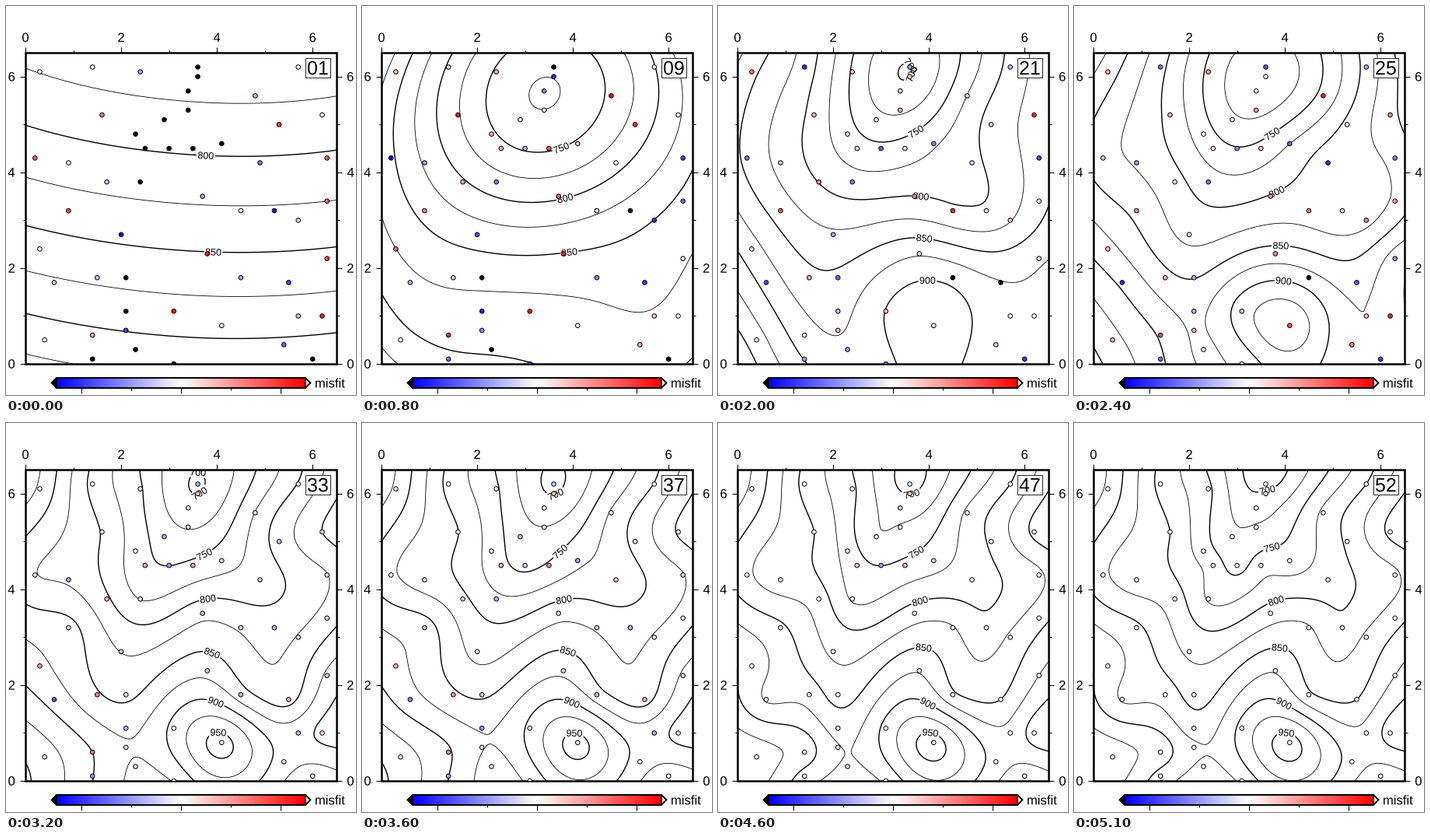
Animation of 450x500 px, one loop 5200 ms. Source, as a matplotlib script:

```python
import numpy as np
import matplotlib.pyplot as plt
from matplotlib.animation import FuncAnimation
from matplotlib.patches import PathPatch, Polygon, Rectangle
from matplotlib.textpath import TextPath
from matplotlib.transforms import Affine2D

W, H, DPI = 450, 500, 100
LEFT, TOP, SIDE, SPAN = 25, 60, 400, 6.5
PT = DPI / 72
FONT = {"family": "Liberation Sans"}
LIMIT = 25                                  # misfit at the ends of the colour scale
LABEL_LINE = np.array([[3.6, 6.5], [4.05, 0.75]])
LEVELS = np.arange(600, 1051, 25)

# Survey points: position and height
xs = [0.3, 1.4, 2.4, 3.6, 5.7, 1.6, 2.9, 3.4, 3.4, 4.8, 5.3, 6.2, 0.2,
      0.9, 2.3, 2.5, 3.0, 3.5, 4.1, 4.9, 6.3, 0.9, 1.7, 2.4, 3.7, 4.5,
      5.2, 6.3, 0.3, 2.0, 3.8, 6.3, 0.6, 1.5, 2.1, 2.1, 3.1, 4.5, 5.5,
      5.7, 6.2, 0.4, 1.4, 1.4, 2.1, 2.3, 3.1, 4.1, 5.4, 6.0, 5.7, 3.6]
ys = [6.1, 6.2, 6.1, 6.2, 6.2, 5.2, 5.1, 5.3, 5.7, 5.6, 5.0, 5.2, 4.3,
      4.2, 4.8, 4.5, 4.5, 4.5, 4.6, 4.2, 4.3, 3.2, 3.8, 3.8, 3.5, 3.2,
      3.2, 3.4, 2.4, 2.7, 2.3, 2.2, 1.7, 1.8, 1.8, 1.1, 1.1, 1.8, 1.7,
      1.0, 1.0, 0.5, 0.6, 0.1, 0.7, 0.3, 0.0, 0.8, 0.4, 0.1, 3.0, 6.0]
zs = [870, 793, 755, 690, 800, 800, 730, 728, 710, 780, 804, 855, 830,
      813, 762, 765, 740, 765, 760, 790, 820, 855, 812, 773, 812, 827,
      805, 840, 890, 820, 873, 875, 873, 865, 841, 862, 908, 855, 850,
      882, 910, 940, 915, 890, 880, 870, 880, 960, 890, 860, 830, 705]
sites = np.column_stack([xs, ys])
heights = np.array(zs, float)
N = len(heights)


def kernel(p):
    """Minimum-curvature Green's function between p and every site."""
    r = np.hypot(p[:, None, 0] - sites[:, 0], p[:, None, 1] - sites[:, 1])
    return r**2 * (np.log(np.where(r > 0, r, 1)) - 1)


def linear(p):
    return np.column_stack([np.ones(len(p)), p])


# Plane trend plus a spline built from the strongest eigenvectors
plane = np.linalg.lstsq(linear(sites), heights, rcond=None)[0]
G = kernel(sites)
lam, vec = np.linalg.eigh(G)
order = np.argsort(-np.abs(lam))
lam, vec = lam[order], vec[:, order]
amp = vec.T @ (heights - linear(sites) @ plane) / lam


def weights(k):
    return vec[:, :k] @ amp[:k]


def surface(p, w):
    return linear(p) @ plane + kernel(p) @ w


def px(x):
    return LEFT + np.asarray(x) * SIDE / SPAN


def py(y):
    return TOP + SIDE - np.asarray(y) * SIDE / SPAN


axis = np.linspace(0, SPAN, 131)
gx, gy = np.meshgrid(axis, axis)
grid = np.column_stack([gx.ravel(), gy.ravel()])
grid_trend, grid_kernel = linear(grid) @ plane, kernel(grid)
s = np.linspace(0, 1, 500)[:, None]
track = LABEL_LINE[0] + s * (LABEL_LINE[1] - LABEL_LINE[0])

fig = plt.figure(figsize=(W / DPI, H / DPI), dpi=DPI, facecolor="white")
ax = fig.add_axes([0, 0, 1, 1])
ax.set_xlim(0, W)
ax.set_ylim(H, 0)
ax.axis("off")
window = Rectangle((LEFT, TOP), SIDE, SIDE, fc="none", ec="black",
                   lw=1.8, zorder=4)
ax.add_patch(window)


def colour(m):
    t = m / LIMIT
    if t < -1:
        return (0, 0, 0)
    if t > 1:
        return (1, 1, 1)
    return (1 + t, 1 + t, 1) if t < 0 else (1, 1 - t, 1 - t)


def glyphs(text, size):
    return TextPath((0, 0), text, size=size, prop=FONT)


def put(text, x, y, size, ha="center", va="center"):
    path = glyphs(text, size)
    box = path.get_extents()
    ax0 = {"left": box.x0, "center": (box.x0 + box.x1) / 2, "right": box.x1}[ha]
    ay0 = (box.y0 + box.y1) / 2 if va == "center" else 0
    move = Affine2D().translate(-ax0, -ay0).scale(1, -1).translate(x, y)
    ax.add_patch(PathPatch(path.transformed(move), fc="black", lw=0))


def tick(x0, y0, dx, dy):
    ax.plot([x0, x0 + dx], [y0, y0 + dy], color="black", lw=0.75,
            solid_capstyle="butt")


def draw_axes():
    right = LEFT + SIDE
    for v in range(7):
        size = 6.9 if v % 2 == 0 else 3.5
        x, y = px(v), py(v)
        tick(x, TOP, 0, -size)
        tick(LEFT, y, -size, 0)
        tick(right, y, size, 0)
        if v % 2 == 0:
            put(str(v), x, TOP - 13.9, 12 * PT, va="base")
            put(str(v), LEFT - 13.9, y, 12 * PT, "right")
            put(str(v), right + 13.9, y, 12 * PT, "left")


def draw_scale():
    x0, x1, y0, y1 = 65, 385, 478, 490.8
    mid, tip = (y0 + y1) / 2, 6.4
    ramp = [[colour(m) for m in np.linspace(-LIMIT, LIMIT, 321)]]
    ax.imshow(ramp, extent=(x0, x1, y1, y0), aspect="auto",
              interpolation="bilinear", zorder=2)
    style = dict(ec="black", lw=1.4, zorder=3)
    ax.add_patch(Polygon([(x0, y0), (x0 - tip, mid), (x0, y1)],
                         fc="black", **style))
    ax.add_patch(Polygon([(x1, y0), (x1 + tip, mid), (x1, y1)],
                         fc="white", **style))
    ax.add_patch(Rectangle((x0, y0), x1 - x0, y1 - y0, fc="none", **style))
    for i in range(-2, 3):
        tick((x0 + x1) / 2 + i * 64, y1, 0, 6.9 if i % 2 == 0 else 3.5)
    put("misfit", 398, 490.4, 12 * PT, "left", "base")


draw_axes()
draw_scale()
dots = ax.scatter(px(xs), py(ys), s=(5.6 / PT)**2, edgecolors="black",
                  linewidths=0.7, zorder=5)
dots.set_clip_path(window)
live = []


def add(patch, clip=True):
    ax.add_patch(patch)
    if clip:
        patch.set_clip_path(window)
    live.append(patch)


def contour_label(level, p, w):
    h = 0.01
    near = p + h * np.array([[1, 0], [-1, 0], [0, 1], [0, -1]])
    e, wst, n, sth = surface(near, w)
    slope = np.array([e - wst, n - sth])
    angle = np.arctan2(-slope[0], -slope[1])
    angle = (angle + np.pi / 2) % np.pi - np.pi / 2
    path = glyphs(str(level), 9 * PT)
    box = path.get_extents()
    turn = (Affine2D().translate(-(box.x0 + box.x1) / 2, -(box.y0 + box.y1) / 2)
            .scale(1, -1).rotate(angle).translate(px(p[0]), py(p[1])))
    pad = 1.9
    corners = [(box.x0 - pad, box.y0 - pad), (box.x1 + pad, box.y0 - pad),
               (box.x1 + pad, box.y1 + pad), (box.x0 - pad, box.y1 + pad)]
    add(Polygon(turn.transform(corners), fc="white", lw=0, zorder=3))
    add(PathPatch(path.transformed(turn), fc="black", lw=0, zorder=3.1))


def counter(k):
    path = glyphs(f"{k:02d}", 18 * PT)
    path = path.transformed(Affine2D().scale(1, -1).translate(387, 88.2))
    box = path.get_extents()
    add(Rectangle((box.x0 - 3, box.y0 - 4), box.width + 6, box.height + 8,
                  fc="white", ec="black", lw=0.6, zorder=6), clip=False)
    add(PathPatch(path, fc="black", lw=0, zorder=7), clip=False)


def draw(i):
    while live:
        live.pop().remove()
    k = i + 1
    w = weights(k)
    z = (grid_trend + grid_kernel @ w).reshape(gx.shape)
    live.append(ax.contour(px(gx), py(gy), z, levels=LEVELS, colors="black",
                           linewidths=[0.6 if v % 50 else 1.0 for v in LEVELS],
                           linestyles="solid", zorder=2))
    along = surface(track, w)
    for level in LEVELS[LEVELS % 50 == 0]:
        d = along - level
        for j in np.flatnonzero(d[:-1] * d[1:] < 0):
            f = d[j] / (d[j] - d[j + 1])
            contour_label(level, track[j] + f * (track[j + 1] - track[j]), w)
    dots.set_facecolor([colour(m) for m in heights - linear(sites) @ plane - G @ w])
    counter(k)
    return live


anim = FuncAnimation(fig, draw, frames=N, interval=100, repeat=True,
                     repeat_delay=0, blit=False, cache_frame_data=False)
plt.show()
```
